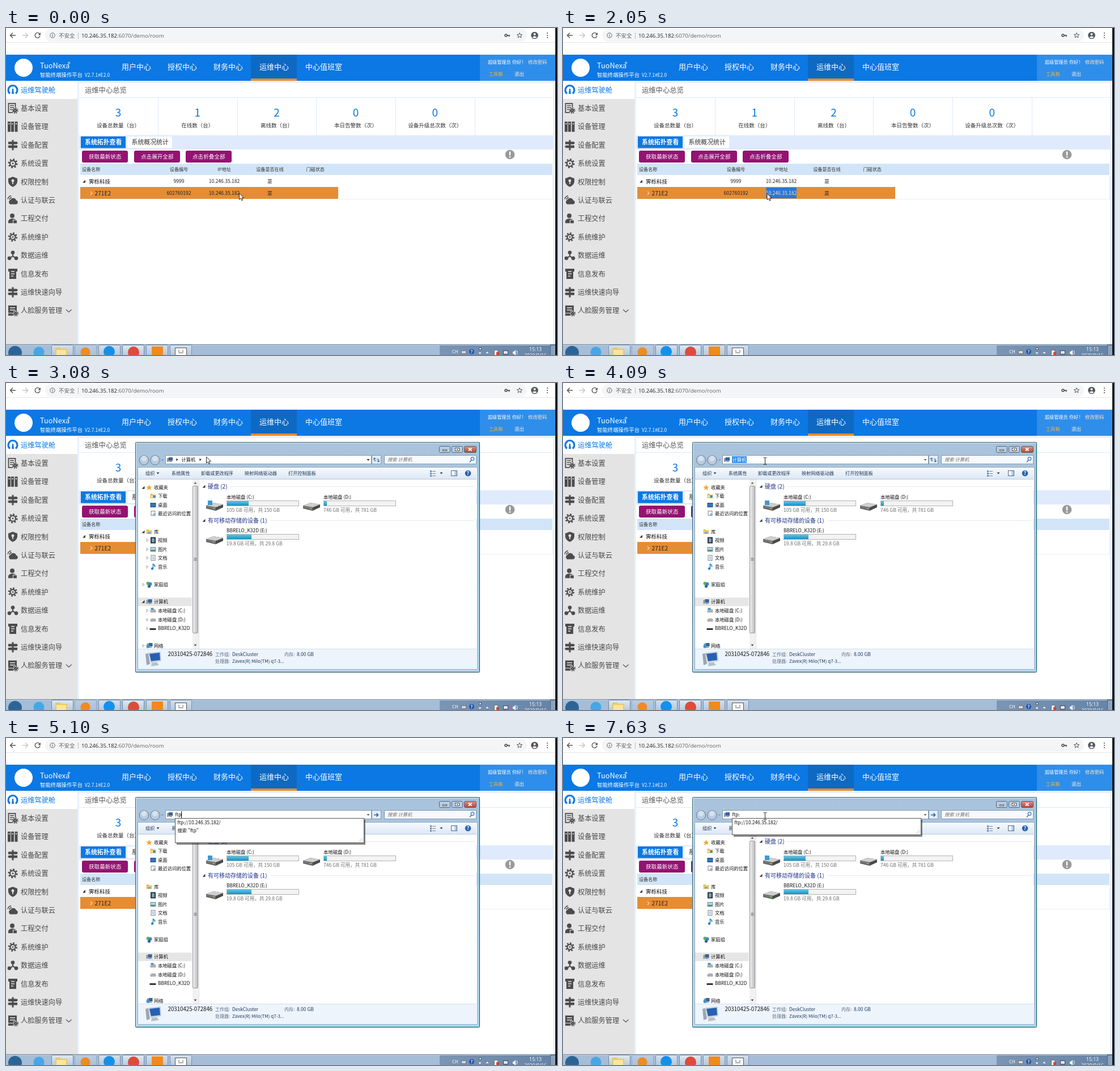
Animation of 972x576 px, one loop 8 s. Source, as an HTML page:

```html
<!DOCTYPE html>
<html lang="zh-CN">
<head>
<meta charset="utf-8">
<title>Device console</title>
<style>
html, body { margin: 0; width: 100%; height: 100%; overflow: hidden; background: #fff; }
svg { display: block; width: 972px; height: 576px; }
text { font-family: "Noto Sans CJK SC", "Noto Sans", sans-serif; white-space: pre; }
.ui { font-family: "Open Sans", "Noto Sans CJK SC", sans-serif; }
</style>
</head>
<body>
<svg id="stage" viewBox="0 0 972 576"></svg>
<script>
const LOOP = 8000;
const IP = '10.246.35.182';
const DISK = 'BBRELO_K32D';
const BLUE = '#0b78e3', INK = '#333', NAVY = '#1e395b', ICON = '#4c4c4c';

// Each step holds until the next one.
const STEPS = [
  { at: 0, arrow: [411.5, 291] },
  { at: 1010, arrow: [388, 291], sel: 380 },
  { at: 1530, arrow: [352.5, 285], sel: 358.5 },
  { at: 2050, arrow: [360, 291.5], sel: 358.5 },
  { at: 2560, arrow: [360, 291.5], sel: 358.5, win: 1 },
  { at: 3080, arrow: [353.5, 130], win: 2, tree: true },
  { at: 3580, arrow: [355, 131], win: 2 },
  { at: 4090, beam: true, win: 2, edit: '计算机', marked: true },
  { at: 4590, beam: true, win: 2, edit: 'f', hints: 2, caret: 301.5 },
  { at: 5100, win: 2, edit: 'ftp', hints: 2, caret: 309.5 },
  { at: 5600, win: 2, edit: 'ftp', hints: 2 },
  { at: 6110, win: 2, edit: 'ftp', hints: 2, caret: 309.5 },
  { at: 6620, win: 2, edit: 'ftp', hints: 2 },
  { at: 7130, beam: true, win: 2, edit: 'ftp:', hints: 1, caret: 311.5 },
  { at: 7630, beam: true, win: 2, edit: 'ftp:', hints: 1 }
];

const R = (x, y, w, h, fill, more = '') =>
  `<rect x="${x}" y="${y}" width="${w}" height="${h}" fill="${fill}" ${more}/>`;
const C = (x, y, r, fill, more = '') =>
  `<circle cx="${x}" cy="${y}" r="${r}" fill="${fill}" ${more}/>`;
const P = (d, fill, more = '') => `<path d="${d}" fill="${fill}" ${more}/>`;
const L = (d, color, w = 1, more = '') =>
  `<path d="${d}" fill="none" stroke="${color}" stroke-width="${w}" ${more}/>`;
const T = (x, y, s, size, fill = INK, more = '') =>
  `<text x="${x}" y="${y}" font-size="${size}" fill="${fill}" ${more}>${s}</text>`;
const M = (x, y, s, size, fill, more = '') => T(x, y, s, size, fill, 'text-anchor="middle" ' + more);
const G = (x, y, body) => `<g transform="translate(${x} ${y})">${body}</g>`;
const box = (x, y, w, h, fill, line, more = '') =>
  R(x + .5, y + .5, w - 1, h - 1, fill, `stroke="${line}" ${more}`);
const down = (x, y, fill = '#222') => P(`M${x - 2.5} ${y - 1.5}h5l-2.5 3z`, fill);
const right = (x, y, fill = '#222') => P(`M${x - 1.5} ${y - 2.5}v5l3-2.5z`, fill);
const open = (x, y) => P(`M${x + 2} ${y - 2.5}v5h-5z`, '#333');
const fade = (id, stops, across) =>
  `<linearGradient id="${id}" x2="${across ? 1 : 0}" y2="${across ? 0 : 1}">` +
  stops.map((c, i) => `<stop offset="${i / (stops.length - 1)}" stop-color="${c}"/>`).join('') +
  '</linearGradient>';

const DEFS = '<defs>' +
  fade('glass', ['#a9c3dc', '#b3cce4', '#bdd5ec']) +
  fade('tools', ['#f7fafe', '#dce7f4']) +
  fade('thumb', ['#f4f4f4', '#d6d6d8', '#bcbcc0'], true) +
  fade('fill', ['#5fc6e8', '#1b8fc0']) +
  fade('red', ['#dd9281', '#b8422c']) +
  fade('tray', ['#7b95b4', '#6583a6'], true) +
  fade('task', ['#dfe9f3', '#b3c6da']) +
  '</defs>';

const gear = (r = 5) =>
  C(0, 0, r, 'none', `stroke="${ICON}" stroke-width="2.2"`) +
  C(0, 0, r + 2.2, 'none', `stroke="${ICON}" stroke-width="2.6" stroke-dasharray="${(r + 2.2) * Math.PI / 8}"`) +
  C(0, 0, r * .3, ICON);
const sheet = box(-8, -9, 13, 17, 'none', ICON, 'stroke-width="1.8"') +
  L('M-5-5h7M-5-1.5h7M-5 2h4', ICON, 1.5);
const signs = P('M-1.5-9h3v18h-3zM-8-6H7l2 2.2-2 2.3H-8zM-9 2.5l2-2H8v4.5H-7z', ICON);
const GLYPHS = [
  L('M-5 6.5A8 8 0 1 1 5 6.5', BLUE, 3.2) + P('M-2 7l1-9h2l1 9z', BLUE),
  sheet + G(4, 4, C(0, 0, 6, '#e4e4e4') + gear(2.2)),
  R(-9, -9, 5, 18, ICON) + R(-3, -9, 5, 18, ICON) + R(3.5, -9, 5, 18, ICON) +
    L('M-7.5-5h2M-1.5-5h2M5-5h2', '#e4e4e4', 2),
  signs,
  gear(),
  P('M0-9L8-6V0Q7 6 0 9Q-7 6-8 0V-6z', ICON) + C(0, -2, 2.4, '#e4e4e4') + R(-.9, -1, 1.8, 5, '#e4e4e4'),
  P('M-5 7A4.5 4.5 0 0 1-4-1A5.5 5.5 0 0 1 6 0A3.6 3.6 0 0 1 6 7z', ICON) + L('M-9-2A8 8 0 0 1-3-8M-6-1A5 5 0 0 1-2-5', ICON, 1.5),
  C(-1, -5, 4, ICON) + P('M-8 8V4Q-6 0-1 0Q5 0 7 4V8z', ICON) + box(0, 2, 8, 7, ICON, '#e4e4e4'),
  gear(4.6),
  L('M0-4V1L-5 5M0 1L5 5', ICON, 2) + C(0, -5, 3.3, ICON) + C(-6, 5, 3.3, ICON) + C(6, 5, 3.3, ICON),
  P('M-8-9H8v5H6V9H-6V-4H-8z', ICON) + L('M-3-4H3M-3 0H3M-3 4H1', '#e4e4e4', 1.4),
  signs,
  P('M-8-9H7V4H-8zM-8 5H1V9H-8z', ICON) + L('M-5-5H4M-5-1H4', '#e4e4e4', 1.5) + G(5, 5, C(0, 0, 5, '#e4e4e4') + gear(1.8))
];
const MENU = ['运维驾驶舱', '基本设置', '设备管理', '设备配置', '系统设置', '权限控制', '认证与联云',
  '工程交付', '系统维护', '数据运维', '信息发布', '运维快速向导', '人脸服务管理'];

function browser() {
  const g = '#5f6368';
  return R(0, 0, 972, 47, '#fff') + R(69, 2, 850, 22, '#f4f5f6', 'rx="11"') + R(0, 25, 972, 1, '#e6e6e8') +
    L('M17 13H8M12 8.5L7.5 13L12 17.5', '#555', 1.4) +
    L('M29 13H38M34 8.5L38.5 13L34 17.5', '#c4c6c8', 1.4) +
    L('M59.5 10.5A4.5 4.5 0 1 0 60 14', '#555', 1.4) + P('M61 8v4.5h-4.5z', '#555') +
    C(82, 13, 4.2, 'none', `stroke="${g}"`) + R(81.5, 12.3, 1.1, 3, g) + R(81.5, 10.5, 1.1, 1.1, g) +
    T(93, 16.5, '不安全', 9.5, g) + R(127, 8, 1, 11, '#b8babd') +
    T(133, 16.5, `${IP}<tspan fill="${g}">:6070/demo/room</tspan>`, 9.7, '#202124', 'class="ui"') +
    C(882, 13, 2, 'none', 'stroke="#444" stroke-width="1.5"') + L('M884 13H889M887.5 13V15.5', '#444', 1.5) +
    L('M906 8.5l1.3 3 3.3.2-2.5 2.1.8 3.2-2.9-1.8-2.9 1.8.8-3.2-2.5-2.1 3.3-.2z', '#555', 1) +
    C(932.5, 13, 6.3, '#54585c') + C(932.5, 11, 2, '#fff') + P('M928.5 16.3q4-3.6 8 0q-4 3.6-8 0z', '#fff') +
    [9, 13, 17].map(y => C(955, y, 1.1, '#555')).join('');
}

function header() {
  const nav = [[204, '用户中心'], [285, '授权中心'], [366, '财务中心'], [447, '运维中心'], [528, '中心值班室']];
  return R(0, 47, 969, 46, BLUE) + C(31, 70, 16, '#fff') +
    T(60, 71, 'TuoNexa', 12.8, '#fff', 'font-weight="500"') + T(108, 66, '+', 11, '#fff') +
    T(60, 86, '智能终端操作平台', 9.4, '#fff', 'font-weight="500"') +
    T(139, 86, 'V2.7.1#E2.0', 8.3, '#fff', 'font-weight="500"') +
    R(432, 47, 81, 46, '#0d69c2') + R(432, 89, 81, 4, '#f08c28') +
    nav.map(([x, s]) => T(x, 73, s, 13, '#fff', 'font-weight="500"')).join('') +
    R(836, 47, 133, 46, '#2f8eea') +
    T(850, 62.5, '超级管理员', 8.1, '#fff') + T(893, 62.5, '你好！', 8.1, '#fff') +
    T(921, 62.5, '修改密码', 8.3, '#fbe6c4') +
    T(852, 84, '工具箱', 8.1, '#ffae2b') + T(897, 84, '退出', 8.5, '#fbeed8');
}

function sidebar() {
  return R(0, 93, 126, 465, '#e4e4e4') + R(0, 93, 126, 32, '#fff') +
    MENU.map((s, i) => {
      const y = 109 + i * 32.4;
      return G(12, y, GLYPHS[i]) + T(26, y + 4.6, s, 12.2, i ? '#484848' : BLUE);
    }).join('') + L('M106 496l4.8 4.5 4.8-4.5', '#555', 1.2);
}

function table(s) {
  const row = (y, id, fill = '#222') => M(305, y, id, 8.6, fill) + M(465.5, y, '是', 8.4, fill);
  const ip = fill => M(385, 294, IP, 8.5, fill);
  const mark = s.sel ? R(s.sel, 281, 412 - s.sel, 19, s.win ? '#b39a85' : '#2a78d8') : '';
  const lit = s.sel && !s.win ?
    `<clipPath id="cut">${R(s.sel, 280, 412 - s.sel, 21, '#fff')}</clipPath><g clip-path="url(#cut)">${ip('#fff')}</g>` : '';
  return R(131, 239, 833, 20, '#d2e5f8') + T(134, 252, '设备名称', 8.1) + M(305, 252, '设备编号', 8.1) +
    M(385, 252, 'IP地址', 8.1) + M(465.5, 252, '设备是否在线', 8.1) + T(529.5, 252, '门磁状态', 8.1) +
    open(138, 270) + T(146, 273.5, '霁栎科技', 9.5, '#111') + row(273, '9999') + M(385, 273, IP, 8.5, '#222') +
    R(131, 280, 455, 21, '#e58d35') + R(586, 301, 379, 1, '#e9eef5') + R(964, 260, 1, 42, '#e9eef5') +
    L('M149 288l3 3-3 3', '#f7d9b4', 1.2) + T(156.5, 294.5, '271E2', 10.2, '#222') +
    row(294, '602760192') + mark + ip('#222') + lit;
}

function content(s) {
  const cards = [['3', '设备总数量（台）'], ['1', '在线数（台）'], ['2', '离线数（台）'], ['0', '本日告警数（次）'], ['0', '设备升级总次数（次）']];
  const keys = [[134, '获取最新状态'], [226, '点击展开全部'], [317, '点击折叠全部']];
  return R(126, 93, 843, 465, '#e9f1fc') + R(129, 97, 836, 461, '#fff') +
    T(139, 114.3, '运维中心总览', 12.3, '#555') + R(129, 122, 836, 1, '#dfeafa') +
    cards.map(([n, s], i) => {
      const x = 198 + i * 139.7;
      return M(x, 156, n, 19, BLUE) + M(x, 174.5, s, 9.5) + R(Math.round(x + 70), 123, 1, 66, '#dfeafa');
    }).join('') +
    R(129, 189, 836, 25, '#dfeafc') + R(132, 191, 79, 20.5, BLUE) +
    T(139, 205.3, '系统拓扑查看', 10.9, '#fff', 'font-weight="700"') +
    R(214, 191, 79, 20.5, '#fff') + T(221.5, 205.3, '系统概况统计', 10.9) +
    keys.map(([x, t]) => R(x, 216, 81, 21, '#931272', 'rx="3"') +
      T(x + 12, 230.3, t, 9.6, '#fff', 'font-weight="500"')).join('') +
    C(889, 223, 8.3, '#999') + R(887.8, 217.5, 2.4, 7, '#fff') + R(887.8, 226, 2.4, 2.4, '#fff') + table(s);
}

function taskbar(s) {
  const btn = (x, a) => box(x, 558, 39, 22, 'url(#task)', '#6f88a3', `rx="2" opacity="${a}"`);
  return R(0, 557, 765, 19, '#a6bdd7') + R(765, 557, 207, 19, 'url(#tray)') +
    R(0, 557, 972, 1, '#6e859e') + R(0, 558, 972, 1, '#c3d3e2') +
    btn(80, s.win ? 1 : .8) + btn(121, .35) + btn(163, .8) + btn(205, 1) + btn(247, .8) + btn(289, .8) +
    C(16, 572, 12, '#2c6595') + C(58, 571, 9.5, '#47a6e6') +
    P('M87 563h8l2 2h11v14H87z', '#e9c868') + R(89, 567, 17, 10, '#f8e5a0') +
    C(140, 571, 8.5, '#ef8b24') + C(182, 570, 10, '#1590ea') +
    C(225, 571, 10, '#dd4b3c') + R(257, 561, 20, 18, '#f08a1d') +
    box(298, 563, 21, 14, '#fff', '#555') + C(305, 569, 1, '#555') + C(312, 569, 1, '#555') + L('M304 572h9', '#555', 1) +
    T(787, 573, 'CH', 8, '#fff') + box(803, 568, 9, 6, '#d8d8d8', '#777') +
    C(821.5, 570, 4.5, '#2556ae') + M(821.5, 573, '?', 7.5, '#fff', 'font-weight="700"') +
    box(834, 563, 5, 4, '#fff', '#456') + down(836, 573, '#fff') + P('M846.5 573h5l-2.5-3z', '#fff') +
    box(861, 567, 7, 10, '#fff', '#777') + R(865, 571, 5, 5, '#d8402e') +
    box(877, 568, 9, 7, '#dde6ef', '#445') + P('M894 570h2l3-3v10l-3-3h-2z', '#fff') + L('M901 568q2 3.5 0 7', '#fff', 1) +
    M(934, 569, '15:13', 8.6, '#fff', 'class="ui"') + M(934, 580, '2020/9/16', 8.3, '#fff', 'class="ui"') +
    box(960, 558, 12, 20, '#8ba3bd', '#4c6480') + R(969, 0, 3, 576, '#111');
}

const pc = (x, y) => G(x, y, box(-2, -4, 7, 6, '#2d68b8', '#44556a') + R(-5, -3, 3, 7, '#8b98a8') + R(-1, 3, 5, 1, '#556'));
const folder = P('M-5-4h4l1 1.5h5V4H-5z', '#e9bd55') + R(-4, -1, 8, 4, '#f7dd8c');
const disk = P('M-5 0l2-2h7l1 2v3H-5z', '#999') + R(-5, 0, 10, 1, '#ddd');
const dish = P('M0 10L13 5L30 8V13L17 19L0 15z', '#4a4a4a') + P('M0 10L13 5L30 8L17 13z', '#cfcfcf') +
  P('M0 10L17 13V18L0 14z', '#757575') + R(12, 14, 3, 1.5, '#7fd06a');
// text x, middle y, label, icon, disclosure (1 open, 2 closed)
const TREE = [
  [261, 184, '收藏夹', P('M0-5l1.5 3.4 3.7.3-2.8 2.4.9 3.6L0 2.8l-3.3 1.9.9-3.6L-5.2-1.3l3.7-.3z', '#f2aa30'), 1],
  [268, 199, '下载', folder + R(0, -1, 4, 4, '#3a86d0')],
  [268, 215, '桌面', box(-5, -4, 10, 8, '#3474bf', '#245084')],
  [268, 230, '最近访问的位置', box(-4, -5, 8, 9, '#f6f6f6', '#888') + C(2, 2, 2.5, '#8fb4d8')],
  [261, 262, '库', folder + R(-3, 0, 6, 3, '#69abd9'), 1],
  [268, 277, '视频', box(-4, -5, 8, 10, '#6ba4c9', '#333', 'stroke-width="2"'), 2],
  [268, 293, '图片', box(-5, -4, 10, 8, '#a8d4f0', '#7b8a98') + R(-4, 1, 8, 2, '#4d9350'), 2],
  [268, 308, '文档', box(-4, -5, 8, 10, '#fff', '#7a8a9a') + L('M-2-2H2M-2 0H2M-2 2H2', '#78a', .8), 2],
  [268, 324, '音乐', L('M0 3V-5Q4-3 3 0', '#2584cc', 1.5) + C(-1.5, 3, 2.2, '#2584cc'), 2],
  [261, 355, '家庭组', C(-2, -2, 3, '#5fb356') + C(2, -1, 3, '#3687c8') + C(0, 3, 2.6, '#2a5f9e'), 2],
  [261, 385, '计算机', pc(0, 0), 1],
  [268, 401, '本地磁盘 (C:)', disk + R(-4, -5, 5, 4, '#4fa0d0'), 2],
  [268, 417, '本地磁盘 (D:)', disk, 2],
  [268, 432, DISK, P('M-6 0h11v3H-6z', '#333'), 2],
  [261, 463, '网络', pc(1, -1) + C(-2, 1, 3, '#3f94cf'), 2]
];

function drive(x, y, name, used, note) {
  return G(x - 36, y + 1, dish) + T(x, y - 1.5, name, 8.4, '#111') +
    box(x, y + 2, 128, 10, '#f3f3f3', '#b2b2b2') + R(x + 1, y + 3, used, 8, 'url(#fill)') +
    T(x, y + 21.7, note, 8.6, '#707070');
}

function explorer(s) {
  const nav = TREE.map(([x, y, t, icon, fold]) => {
    const tip = !s.tree || !fold ? '' : fold === 1 ? open(242.5, y) :
      P(`M${x - 20} ${y - 2.5}v5l3-2.5z`, '#fff', 'stroke="#999" stroke-width=".8"');
    return G(x - 8.5, y, icon) + T(x, y + 3, t, 8.3, '#111') + tip;
  }).join('');
  const cmds = [[246, '组织'], [292, '系统属性'], [344, '卸载或更改程序'], [421, '映射网络驱动器'], [498, '打开控制面板']];
  const group = (y, t, x) => open(349.5, y) + T(356, y + 3.5, t, 10, '#1e3287') + R(x, y, 826 - x, 1, '#e1e7f0');
  return R(233, 149, 597, 355, '#fff') + R(233, 149, 597, 20, 'url(#tools)') + R(233, 169, 597, 1, '#b9c9dc') +
    cmds.map(([x, t]) => T(x, 162, t, 8.15, NAVY)).join('') + down(268, 159, NAVY) +
    [0, 4, 8].map(d => R(748, 154 + d, 3, 3, '#6c8cb0') + R(752, 155 + d, 6, 1, '#789')).join('') + down(768, 159, NAVY) +
    box(785, 154, 11, 10, '#fff', '#4a6a90') + R(791, 155, 4, 8, '#b5cde6') +
    C(815, 159, 5.3, '#2c62b4') + M(815, 162.3, '?', 8.5, '#fff', 'font-weight="700"') +
    R(233, 378, 95, 15, '#e6e6e6') + nav + R(340, 170, 1, 298, '#dfe6ee') +
    group(182, '硬盘 (2)', 396) + group(242, '有可移动存储的设备 (1)', 467) +
    drive(389, 205, '本地磁盘 (C:)', 38, '105 GB 可用，共 150 GB') + R(356, 207, 8, 8, '#3c9ad0') +
    drive(560, 205, '本地磁盘 (D:)', 5, '746 GB 可用，共 781 GB') +
    drive(389, 264, DISK + ' (E:)', 43, '19.8 GB 可用，共 29.8 GB') +
    R(233, 468, 597, 36, '#eef4fc') + R(233, 468, 597, 1, '#d2deeb') +
    P('M251 475l22-2 1 17-19 3z', '#c9d2dc') + P('M253 477l18-2 1 13-16 2z', '#2660b4') + P('M246 477l5-1 3 19-6 2z', '#9aa7b5') +
    P('M257 493l9-1 4 5-14 2z', '#b5bfca') +
    T(285.5, 481, '20310425-072846', 9.7, '#111') +
    T(369, 481, '工作组:', 8, '#5a6b80') + T(399, 481, 'DeskCluster', 8.3, NAVY) +
    T(491, 481, '内存:', 8.1, '#5a6b80') + T(513, 481, '8.00 GB', 8.5, NAVY) +
    T(369, 493, '处理器:', 8, '#5a6b80') + T(399, 493, 'Zavex(R) Milo(TM) q7-3...', 8, NAVY);
}

function address(s) {
  if (!s.edit) return right(302, 135) + T(309.5, 138, '计算机', 8.3, '#111') + (s.win > 1 ? right(343, 135) : '');
  return (s.marked ? R(298, 129, 26, 12, '#3390ea') : '') +
    T(298.5, 138, s.edit, 8.3, s.marked ? '#fff' : '#111') +
    (s.caret ? R(s.caret - .5, 129, 1, 12, '#000') : '');
}

function hints(s) {
  if (!s.hints) return '';
  const h = s.hints > 1 ? 44 : 30, foot = 141 + h;
  return R(301, 144, 333, h, '#000', 'opacity=".45"') + box(298, 141, 334, h, '#fff', '#555') +
    T(302.5, 152, `ftp://${IP}/`, 8.3, '#111') + (s.hints > 1 ? T(302.5, 166, `搜索 "${s.edit}"`, 8.3, '#111') : '') +
    L(`M622 ${foot - 2}l8-8M625 ${foot - 2}l5-5M628 ${foot - 2}l2-2`, '#bbb', .8);
}

function frame(s) {
  const ring = 'M228 104H836V510H228zM233 148V504H831V148z';
  const cap = (x, w, fill) => box(x, 111, w, 12, fill, '#4f647c', 'rx="2"');
  const knob = x => C(x, 136, 8.3, '#b9cbde', 'stroke="#657c96"') + C(x, 133, 5, '#dce7f1', 'opacity=".8"');
  const go = s.hints ? L('M649 135.5h7M653.5 132.5l3 3-3 3', '#2264b8', 1.6) :
    L('M650 132v5h3M657 139v-5h-3M648 134l2-2 2 2M655 137l2 2 2-2', '#3a6a9c', 1.1);
  return P(ring, 'url(#glass)', 'fill-rule="evenodd"') + box(228, 104, 608, 406, 'none', '#28535f', 'rx="2"') +
    L('M229.5 508V105.5H834', '#e2eef8') + L('M834.5 106V508.5H230', '#6fd3e6') +
    L('M232.5 148.5V504.5H831.5V148.5z', '#8fadc8') +
    cap(764, 20, '#b7cce1') + cap(786, 20, '#b7cce1') + cap(808, 22, 'url(#red)') +
    box(770, 117, 8, 3, '#fff', '#555') + box(792, 114, 8, 6, '#fff', '#555') + R(795, 116, 2, 2, '#556') +
    L('M816 114.5l5.5 5M821.5 114.5l-5.5 5', '#fff', 1.8) +
    knob(243.5) + knob(263) + down(276, 136, '#8b9db0') +
    box(281, 127, 364, 16, '#fff', '#8599ae') + box(645, 127, 17, 16, '#e3edf7', '#8599ae') +
    pc(289, 135) + down(639, 135.5, s.edit ? '#2b7a35' : '#222') + go +
    box(667, 127, 163, 16, '#f6f9fd', '#8599ae') + T(673, 138.3, '搜索 计算机', 8.3, '#707070', 'font-style="italic"') +
    C(823, 133.5, 2.8, 'none', 'stroke="#3a74b8" stroke-width="1.2"') + L('M821 136l-3 3.5', '#3a74b8', 1.5) +
    address(s);
}

const scroller = R(329, 170, 11, 298, '#f1f1f1') + P('M331.5 177.5h5l-2.5-3z', '#555') + down(334, 462, '#444') +
  box(329, 181, 10, 260, 'url(#thumb)', '#999', 'rx="1.5"') + L('M331.5 308.5h5M331.5 310.5h5M331.5 312.5h5', '#777', 1);

function pointer(s) {
  if (s.arrow) return G(...s.arrow, P('M0 0V11.2L2.6 8.8L4.4 12.8L6.2 12L4.5 8.1H8z', '#fff', 'stroke="#111" stroke-width=".9"'));
  return s.beam ? L('M353.8 131.5h2l.7.7.7-.7h2M356.5 132v11M353.8 143.5h2l.7-.7.7.7h2', '#222', 1) : '';
}

const stage = document.getElementById('stage');
let shown;
function tick() {
  const t = performance.now() % LOOP;
  const s = STEPS.findLast(step => step.at <= t);
  if (s !== shown) {
    shown = s;
    stage.innerHTML = DEFS + R(0, 0, 972, 576, '#fff') + browser() + content(s) + header() + sidebar() + taskbar(s) +
      (s.win > 1 ? explorer(s) : '') + (s.win ? scroller + frame(s) : '') + hints(s) + pointer(s);
  }
  requestAnimationFrame(tick);
}
tick();
</script>
</body>
</html>
```
